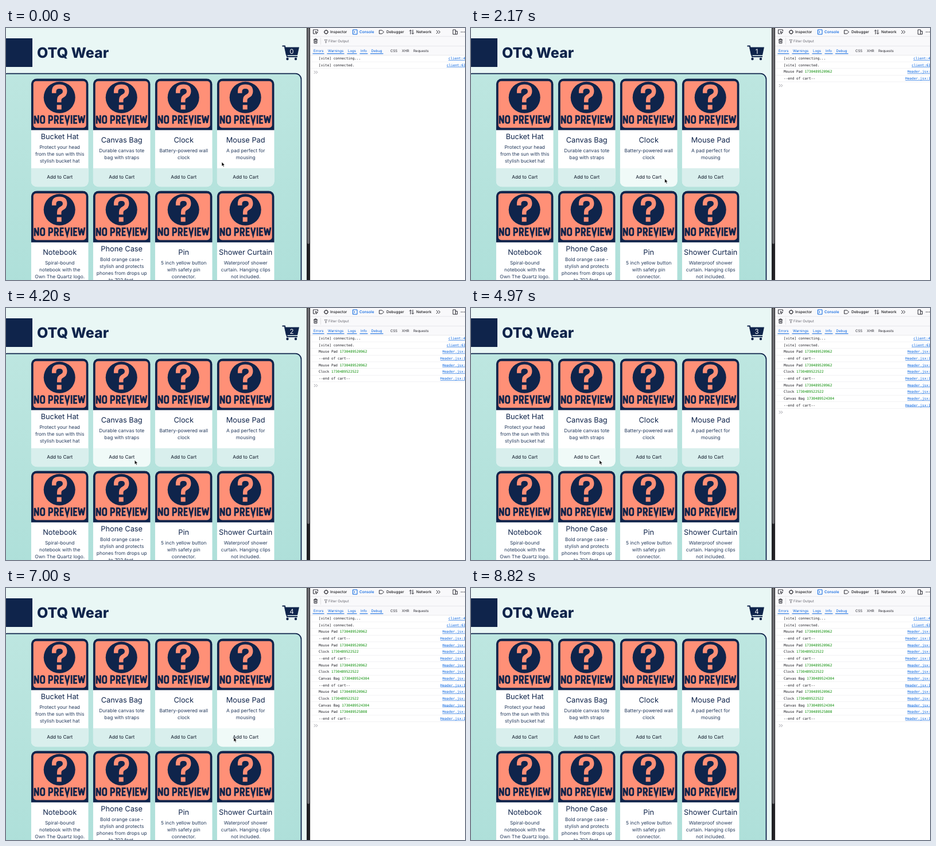
These frames come from a looping animation (800 px wide and 440 px high, 9100 ms). An HTML page:

```html
<!DOCTYPE html>
<html lang="en">
<head>
<meta charset="utf-8">
<title>Shop cart</title>
<style>
  html, body { margin: 0; width: 100%; height: 100%; overflow: hidden; background: #fff; }
  svg { display: block; width: 800px; height: 440px; }
  text { font-family: Inter, "Open Sans", sans-serif; white-space: pre; }
  .mid { text-anchor: middle; }
  .name { font-size: 12.8px; fill: #0f244b; }
  .desc { font-size: 8.4px; fill: #243a5c; }
  .add { font-size: 8.3px; fill: #0c1526; }
  .tab { font-size: 6.5px; font-weight: 500; fill: #18181c; }
  .chip { font-size: 6.1px; fill: #2a2a32; }
  .on { fill: #0060df; }
  .mono { font: 6.1px "DejaVu Sans Mono", "Noto Sans Mono", monospace; fill: #1b1b22; }
  .mono .num { fill: #058b00; }
  .link { fill: #0060df; text-decoration: underline; }
  .icon { fill: none; stroke: #2a2a32; stroke-width: 1; }
</style>
</head>
<body>
<svg id="stage" viewBox="0 0 800 440" text-rendering="geometricPrecision"></svg>
<script>
const LOOP = 9100, STEP = 70, ROW = 11.64;
const NAVY = '#0f244b', CORAL = '#ff9077';

const products = [
  ['Bucket Hat', 'Protect your head', 'from the sun with this', 'stylish bucket hat'],
  ['Canvas Bag', 'Durable canvas tote', 'bag with straps'],
  ['Clock', 'Battery-powered wall', 'clock'],
  ['Mouse Pad', 'A pad perfect for', 'mousing'],
  ['Notebook', 'Spiral-bound', 'notebook with the', 'Own The Quartz logo.'],
  ['Phone Case', 'Bold orange case -', 'stylish and protects', 'phones from drops up', 'to 702 feet.'],
  ['Pin', '5 inch yellow button', 'with safety pin', 'connector.'],
  ['Shower Curtain', 'Waterproof shower', 'curtain. Hanging clips', 'not included.']
];

const clicks = [
  { at: 1260, name: 'Mouse Pad', id: 1730489520962 },
  { at: 2800, name: 'Clock', id: 1730489522522 },
  { at: 4620, name: 'Canvas Bag', id: 1730489524304 },
  { at: 6090, name: 'Mouse Pad', id: 1730489525808 }
];

// Pointer stops: time, x, y
const stops = [
  [0, 376, 234], [70, 376, 234], [700, 414, 264], [1470, 414, 264], [2520, 311, 263],
  [3150, 311, 263], [4480, 213, 266], [4830, 213, 266], [5740, 384, 262], [6020, 397, 261],
  [7280, 397, 261], [7910, 500, 345], [8330, 500, 345], [8610, 560, 452], [LOOP, 560, 452]
];

const text = (x, y, s, cls, extra = '') => `<text x="${x}" y="${y}" class="${cls}" ${extra}>${s}</text>`;
const rect = (x, y, w, h, fill, extra = '') =>
  `<rect x="${x}" y="${y}" width="${w}" height="${h}" fill="${fill}" ${extra}/>`;
const icon = (d, extra = '') => `<path class="icon" d="${d}" ${extra}/>`;

const defs = `<defs>
  <linearGradient id="mint" x2="0" y2="1"><stop stop-color="#bde6e0"/><stop offset="1" stop-color="#addfd9"/></linearGradient>
  <clipPath id="round"><rect width="100" height="189" rx="10"/></clipPath>
  <g id="preview">
    ${rect(0, 0, 100, 90, NAVY)}${rect(4, 4.5, 92, 81.5, CORAL, 'rx="5"')}
    <circle cx="49.5" cy="33" r="27.5" fill="${NAVY}"/>
    <path d="M40 25.5v-3q0-8.500 9-8.500h1q9 0 9 8.500q0 5.500-5.500 8q-4.500 2-4.500 7v4" fill="none" stroke="${CORAL}" stroke-width="7.500"/>
    ${rect(45, 46, 8, 8, CORAL)}
    <path aria-label="No Preview" transform="translate(5 64)" fill="none" stroke="${NAVY}" stroke-width="2.8" d="
      M1.4 15V1L7.6 14V0
      M11.900 4.400q0-3 3.100-3t3.100 3v6.200q0 3-3.100 3t-3.100-3z
      M26.400 15V1.400h2.600q3 0 3 3v1.200q0 3-3 3h-2.600
      M36.400 15V1.400h2.600q3 0 3 3v1q0 3-3 3h-2.600M39.400 8.400L42.200 15
      M52 1.400h-5.600v12.200h5.600M46.400 7.400h4.800
      M54.500 0L58 13.500L61.500 0 M65.400 0V15
      M75.400 1.400h-5.600v12.200h5.600M69.800 7.400h4.800
      M77.500 0L80 13.500L82.900 2L85.800 13.500L88.300 0"/>
  </g></defs>`;

function card([name, ...lines], i) {
  const x = 43.7 + (i % 4) * 108, y = 88.3 + (i > 3) * 196;
  const long = lines.length > (i > 3 ? 3 : 2);
  const base = long ? 105.7 : 111.7;
  return `<g transform="translate(${x} ${y})"><g clip-path="url(#round)">
    ${rect(0, 0, 100, 189, '#fff')}<use href="#preview"/>
    ${i < 4 ? rect(0, 156.500, 100, 33, '#d9efed', `id="button${i}"`) : ''}</g>
    ${text(50, base, name, 'mid name')}
    ${lines.map((s, n) => text(50, base + 17.3 + n * 12, s, 'mid desc')).join('')}
    ${i < 4 ? text(50, 175, 'Add to Cart', 'mid add') : ''}</g>`;
}

const shop = rect(0, 0, 525, 440, '#e9f7f5') +
  rect(-4, 18, 50, 50, NAVY) +
  text(54, 52.3, 'OTQ Wear', '', `font-size="25" font-weight="800" fill="${NAVY}"`) +
  `<g fill="${NAVY}"><path d="M485 33.500h26l-3 14h-20z"/><circle cx="490.500" cy="54" r="2.200"/><circle cx="505" cy="54" r="2.200"/>
   <path d="M481.500 31.500h4.500l4 18.500h18" fill="none" stroke="${NAVY}" stroke-width="1.800"/></g>` +
  text(498, 45.3, '0', 'mid', 'id="count" font-size="11.500" fill="#fff"') +
  `<rect x="-8" y="79.700" width="522.500" height="400" rx="10" fill="url(#mint)" stroke="${NAVY}" stroke-width="1.800"/>` +
  products.map(card).join('') +
  rect(524, 0, 6.300, 440, '#202024') + rect(525, 0, 4, 377, '#6c6c70', 'rx="2"');

const chips = [['Errors', 536, 553], ['Warnings', 561, 588], ['Logs', 596, 610], ['Info', 618, 629], ['Debug', 636.500, 656]];
const tools = rect(530.300, 0, 270, 440, '#fff') + rect(530.300, 0, 270, 47, '#f9f9fb') +
  [14.500, 31, 47].map(y => rect(530.300, y, 270, .6, '#dcdce0')).join('') +
  icon('M539 10h-3.500v-7h8v3M539 6l4.500 1.800-2 .7-.7 2z') +
  icon('M555.500 4.500h5v5h-5zM558 2.500v2M558 9.500v2M553.500 7h2M560.500 7h2') +
  icon('M604.500 3h7.500v8h-7.500zM606.300 5.300l1.800 1.700-1.800 1.700', 'style="stroke:#0060df"') +
  icon('M650.500 4h5l3 3-3 3h-5z') +
  icon('M705 11V3.500M703 5.500l2-2 2 2M709 3v7.500M707 8.500l2 2 2-2') +
  icon('M750 4l3 3-3 3M753.500 4l3 3-3 3') +
  icon('M779 3h4.500v8h-4.500zM783.500 5.500h3v5.500h-3') +
  '<g fill="#2a2a32"><circle cx="793.500" cy="7" r=".8"/><circle cx="796.300" cy="7" r=".8"/><circle cx="799.100" cy="7" r=".8"/></g>' +
  text(565, 9.400, 'Inspector', 'tab') + text(616, 9.400, 'Console', 'tab on') +
  text(663, 9.400, 'Debugger', 'tab') + text(715, 9.400, 'Network', 'tab') +
  icon('M536 20.500h7M538 20v-1h3v1M537 20.500v6h5v-6M538.800 22v3M540.300 22v3') +
  rect(548, 17, .6, 12, '#d4d4d8') +
  icon('M555 20.500h5l-2 2.500v3h-1v-3z', 'style="stroke:#75757d;stroke-width:.8"') +
  text(562, 25.300, 'Filter Output', 'chip', 'style="fill:#6a6a72"') +
  chips.map(([s, a, b]) => text(a, 41.500, s, 'chip on') + rect(a - 1.500, 44.300, b - a + 3, 1, '#0060df')).join('') +
  text(670, 41.500, 'CSS', 'chip') + text(690, 41.500, 'XHR', 'chip') + text(710, 41.500, 'Requests', 'chip');

const rows = [
  { at: 0, body: '[vite] connecting...', link: 'client:4', x: 771 },
  { at: 0, body: '[vite] connected.', link: 'client:61', x: 768 }
];
clicks.forEach(({ at }, i) => {
  clicks.slice(0, i + 1).forEach(({ name, id }) =>
    rows.push({ at, body: `${name} <tspan class="num">${id}</tspan>`, link: 'Header.jsx:2', x: 760.500 }));
  rows.push({ at: at + STEP, body: '--end of cart--', link: 'Header.jsx:1', x: 757 });
});
const log = rows.map(({ body, link, x }, i) => {
  const y = 55.200 + i * ROW;
  return `<g class="row">${text(545, y, body, 'mono')}${text(x, y, link, 'mono link')}
    ${rect(530.300, y + 3.600, 270, .5, '#e4e4e8')}</g>`;
}).join('');

const overlay = `<g id="prompt">${icon('M537-2.500l2.500 2.500-2.500 2.500M540.300-2.500l2.500 2.500-2.500 2.500', 'style="stroke:#8b8b93;stroke-width:.9"')}</g>
  <circle id="ring" fill="#fff" fill-opacity=".3" stroke="#a58a9d" stroke-width="1.400"/>
  <path id="pointer" d="M0 0v7.300l1.700-1.500 1.200 2.700 1.300-.6-1.200-2.600h2.300z" fill="#000" stroke="#fff" stroke-width=".6"/>`;

const $ = id => document.getElementById(id);
$('stage').innerHTML = defs + shop + tools + log + overlay;
const rowNodes = [...document.querySelectorAll('.row')];

function pointerAt(t) {
  const n = stops.findIndex(s => s[0] > t);
  const [t0, x0, y0] = stops[n - 1], [t1, x1, y1] = stops[n];
  const p = (t - t0) / (t1 - t0), e = p * p * (3 - 2 * p);
  return [x0 + (x1 - x0) * e, y0 + (y1 - y0) * e];
}

function draw(t) {
  const [x, y] = pointerAt(t);
  $('pointer').setAttribute('transform', `translate(${x} ${y})`);
  for (let i = 0; i < 4; i++) {
    const left = 43.700 + i * 108;
    const hover = x > left && x < left + 100 && y > 244.800 && y < 277;
    $('button' + i).setAttribute('fill', hover ? '#f0faf8' : '#d9efed');
  }

  $('count').textContent = clicks.filter(c => t >= c.at).length;
  const shown = rows.filter(r => t >= r.at).length;
  rowNodes.forEach((g, i) => g.style.display = i < shown ? '' : 'none');
  $('prompt').setAttribute('transform', `translate(0 ${54 + shown * ROW})`);

  const press = clicks.find(c => t >= c.at - 140 && t < c.at + 210);
  const ring = $('ring');
  ring.style.display = press ? '' : 'none';
  if (press) {
    const age = t - press.at + 140;
    ring.setAttribute('cx', x);
    ring.setAttribute('cy', y);
    ring.setAttribute('r', 9 + 5 * Math.min(1, age / 140));
    ring.style.opacity = Math.min(1, (350 - age) / 140);
  }
}

function tick() {
  const t = performance.now() % LOOP;
  draw(Math.floor(t / STEP) * STEP);
  requestAnimationFrame(tick);
}
tick();
</script>
</body>
</html>
```
